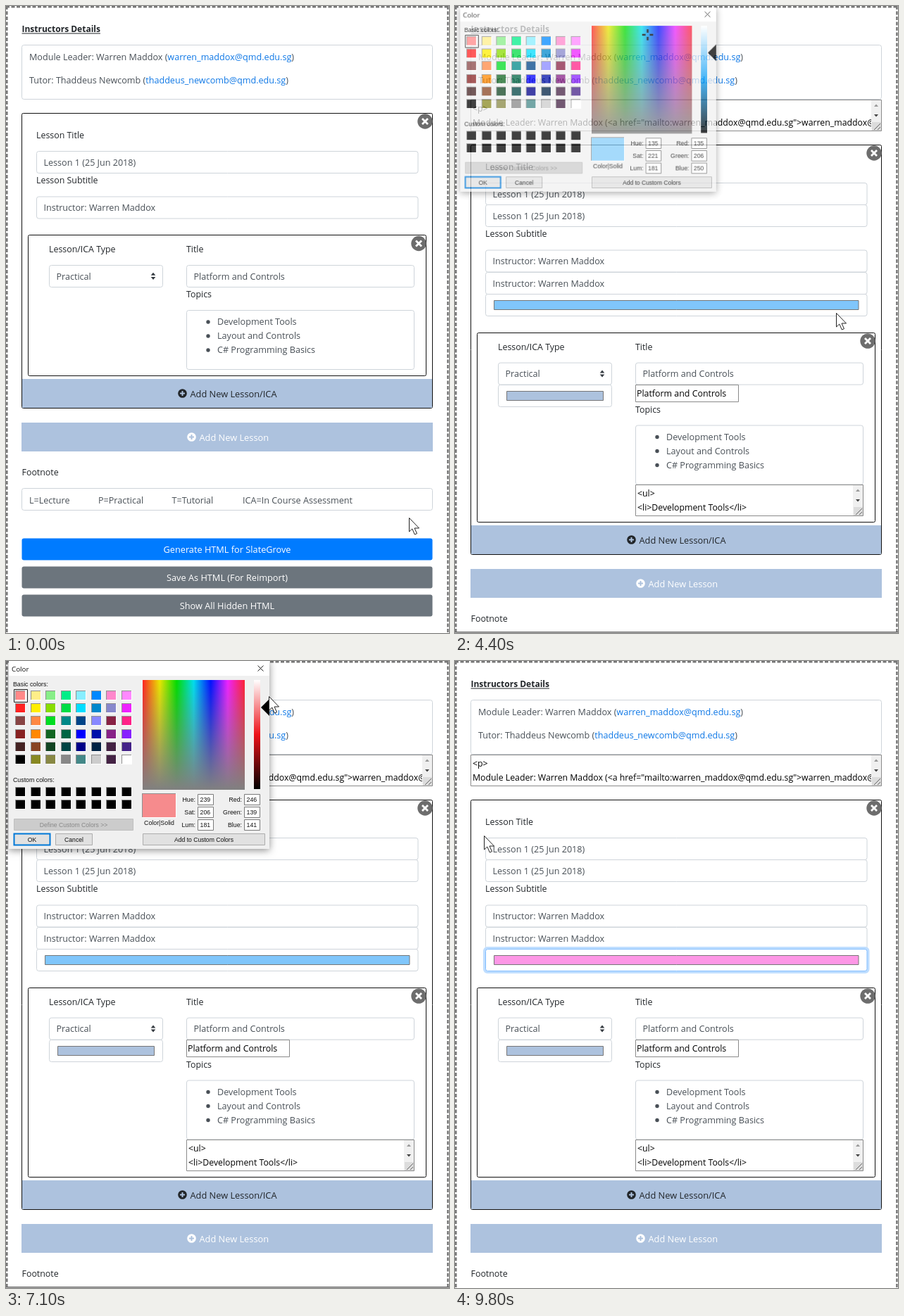
An HTML page with a canvas that plays this animation: 629x891 px, repeating every 10 s.

```html
<!DOCTYPE html>
<html lang="en">
<head>
<meta charset="utf-8">
<title>Lesson plan editor</title>
<style>
html, body { margin: 0; width: 100%; height: 100%; overflow: hidden; background: #fff; }
canvas { display: block; }
</style>
</head>
<body>
<canvas id="stage" width="629" height="891"></canvas>
<script>
const LOOP = 10000;
const UI = '"Open Sans", "Noto Sans", sans-serif';
const SMALL = '"Liberation Sans", Arial, sans-serif';
const INK = '#212529', FIELD = '#495057', LINE = '#ced4da', STEEL = '#adc2de';
const LEADER = 'Warren Maddox', LEADER_MAIL = 'warren_maddox@qmd.edu.sg';
const TUTOR = 'Thaddeus Newcomb', TUTOR_MAIL = 'thaddeus_newcomb@qmd.edu.sg';

const stage = document.getElementById('stage').getContext('2d');
const dialogLayer = document.createElement('canvas');
dialogLayer.width = 400;
dialogLayer.height = 300;
let g = stage;

const clamp = (v, a = 0, b = 1) => Math.min(b, Math.max(a, v));
const mix = (a, b, k) => `rgb(${a.map((v, i) => v + (b[i] - v) * k)})`;

// ---------- drawing helpers ----------
function text(s, x, y, { color = INK, size = 12.4, font = UI, weight = '', align = 'left' } = {}) {
  g.font = `${weight} ${size}px ${font}`;
  g.textAlign = align;
  g.fillStyle = color;
  g.fillText(s, x, y + size * 0.36);
  return x + g.measureText(s).width;
}
const fieldText = (s, x, y, color = FIELD) => text(s, x, y, { color, size: 12.6 });
function box(x, y, right, bottom, { fill, line, radius = 0, width = 1 } = {}) {
  g.beginPath();
  g.roundRect(x + 0.5, y + 0.5, right - x - 1, bottom - y - 1, radius);
  if (fill) { g.fillStyle = fill; g.fill(); }
  if (line) { g.strokeStyle = line; g.lineWidth = width; g.stroke(); }
}
function rect(x, y, w, h, color) {
  g.fillStyle = color;
  g.fillRect(x, y, w, h);
}
function shape(points, fill, line) {
  g.beginPath();
  points.forEach(p => g.lineTo(...p));
  g.closePath();
  if (fill) { g.fillStyle = fill; g.fill(); }
  if (line) { g.strokeStyle = line; g.lineWidth = 1; g.stroke(); }
}
function strokes(color, width, ...segments) {
  g.strokeStyle = color;
  g.lineWidth = width;
  g.beginPath();
  for (const [x1, y1, x2, y2] of segments) { g.moveTo(x1, y1); g.lineTo(x2, y2); }
  g.stroke();
}
function disc(x, y, r, color) {
  g.fillStyle = color;
  g.beginPath();
  g.arc(x, y, r, 0, 7);
  g.fill();
}
const triangle = (x, y, w, h, color) => shape([[x - w, y], [x + w, y], [x, y + h]], color);

// ---------- form parts ----------
const frame = (x, y, right, bottom) => box(x, y, right, bottom, { fill: '#fff', line: LINE, radius: 3 });
const card = (x, y, right, bottom) => box(x, y, right, bottom, { line: '#111', radius: 2 });
function input(s, x, y, right) {
  frame(x, y, right, y + 32);
  fieldText(s, x + 10.5, y + 16);
}
function colorInput(x, y, right, color, focused) {
  if (focused) box(x - 1.5, y - 1.5, right + 1.5, y + 33.5, { line: '#bfdeff', width: 4, radius: 4 });
  box(x, y, right, y + 32, { fill: '#fff', line: focused ? '#80bdff' : LINE, radius: 3 });
  box(x + 12, y + 9, right - 12, y + 23, { fill: color, line: '#777' });
}
function textarea(lines, x, y, right, bottom) {
  box(x, y, right, bottom, { fill: '#fff', line: '#8a8a8a' });
  lines.forEach((s, i) => text(s, x + 3, y + 12.5 + i * 20, { color: '#000', size: 12.3 }));
  rect(right - 15, y + 1, 14, bottom - y - 2, '#f0f0f0');
  triangle(right - 8, y + 10, 3, -3.5, '#999');
  triangle(right - 8, y + 21, 3, 3.5, '#444');
  rect(right - 14, bottom - 13, 13, 12, '#dcdcdc');
  strokes('#666', 1, [right - 11, bottom - 2, right - 2, bottom - 11], [right - 6, bottom - 2, right - 2, bottom - 6]);
}
function closeBadge(x, y) {
  disc(x, y, 10.7, '#6d6d6d');
  strokes('#fff', 2.8, [x - 4, y - 4, x + 4, y + 4], [x + 4, y - 4, x - 4, y + 4]);
}
function addBar(s, x, y, right, iconX, color, sign) {
  rect(x, y, right - x, 41, STEEL);
  disc(iconX, y + 20.5, 6.3, color);
  strokes(sign, 2, [iconX - 3.5, y + 20.5, iconX + 3.5, y + 20.5], [iconX, y + 17, iconX, y + 24]);
  text(s, iconX + 11, y + 21, { color, size: 12.8 });
}
function button(s, y, from, to, hover) {
  box(22, y, 606, y + 32, { fill: mix(from, to, hover), radius: 3 });
  text(s, 314, y + 16, { color: '#fff', align: 'center', size: 12.75 });
}
function person(role, name, mail, y) {
  const x = fieldText(`${role}: ${name} (`, 33, y);
  fieldText(')', fieldText(mail, x, y, '#0f78e6'), y);
}
const hover = (t, enter, leave) => clamp((t - enter) / 150) - clamp((t - leave) / 150);

// ---------- page ----------
function drawPage(t, open, accepted) {
  const shift = n => open ? n : 0;
  rect(0, 0, 629, 891, '#fff');
  g.setLineDash([5, 2.5]);
  strokes('#777', 2.5, [0, 1.2, 629, 1.2], [1.3, 0, 1.3, 891], [627.4, 0, 627.4, 891]);
  g.setLineDash([]);

  const end = text('Instructors Details', 22.5, 33, { weight: 'bold', size: 12 });
  rect(22.5, 38.5, end - 22.5, 1, INK);
  frame(22, 55, 606, 133);
  person('Module Leader', LEADER, LEADER_MAIL, 72);
  person('Tutor', TUTOR, TUTOR_MAIL, 105);
  if (open) {
    textarea(['<p>', `Module Leader: ${LEADER} (<a href="mailto:${LEADER_MAIL}">warren_maddox@q`], 22, 133, 606, 178);
  }

  let y = shift(45);
  card(22, 152 + y, 606, 572 + shift(208));
  closeBadge(595, 164 + y);
  text('Lesson Title', 43, 184 + y);
  input('Lesson 1 (25 Jun 2018)', 43, 206 + y, 585.5);
  if (open) input('Lesson 1 (25 Jun 2018)', 43, 282, 585.5);

  y = shift(76);
  text('Lesson Subtitle', 43, 248 + y);
  input('Instructor: ' + LEADER, 43, 270.5 + y, 585.5);
  if (open) {
    input('Instructor: ' + LEADER, 43, 378, 585.5);
    colorInput(43, 409, 585.5, accepted ? '#fd97e6' : '#80c6fb', accepted);
  }

  y = shift(138.6);
  card(31, Math.round(326 + y - 0.6), 597, open ? 734 : 526);
  closeBadge(586, 337.5 + y);
  text('Lesson/ICA Type', 61, 345.5 + y);
  text('Title', 256, 345.5 + y);
  input('Practical', 61, 368 + y, 223);
  triangle(209, 382.8 + y, 3.3, -4, '#343a40');
  triangle(209, 385 + y, 3.3, 4, '#343a40');
  input('Platform and Controls', 256, 368 + y, 580);
  if (open) {
    colorInput(61, 538, 223, STEEL);
    box(256, 538, 403, 563, { fill: '#fff', line: '#8a8a8a' });
    text('Platform and Controls', 258, 551, { color: '#000' });
  }

  y = shift(163.5);
  text('Topics', 256, 410 + y);
  frame(256, 432 + y, 580, 517 + y);
  ['Development Tools', 'Layout and Controls', 'C# Programming Basics'].forEach((s, i) => {
    disc(287, 449 + y + i * 20, 2.7, FIELD);
    fieldText(s, 300, 448.5 + y + i * 20);
  });
  if (open) textarea(['<ul>', '<li>Development Tools</li>'], 256, 680, 580, 725);

  y = shift(208);
  addBar('Add New Lesson/ICA', 23, 530 + y, 605, 250.5, INK, STEEL);
  addBar('Add New Lesson', 22, 592 + y, 606, 263.5, '#fff', STEEL);
  text('Footnote', 22.5, 663 + y);
  if (open) return;
  frame(22, 685, 606, 717);
  [['L=Lecture', 33], ['P=Practical', 131], ['T=Tutorial', 235.5], ['ICA=In Course Assessment', 336]]
    .forEach(([s, x]) => fieldText(s, x, 702));
  const grey = [108, 117, 125], dark = [90, 98, 104];
  button('Generate HTML for SlateGrove', 756, [0, 123, 255], [0, 105, 217], hover(t, 1550, 1700));
  button('Save As HTML (For Reimport)', 796, grey, dark, hover(t, 1720, 1880));
  button('Show All Hidden HTML', 836, grey, dark, hover(t, 1880, LOOP));
}

// ---------- colour dialog ----------
const PALETTE = ('f88 fe8 8e8 0e8 8ef 08f f8c f8f  f22 fe0 8d0 0d4 0df 08c 88c e2f ' +
  '844 f84 0d2 088 048 88f 824 f28  822 f80 162 064 00f 01a 828 82f ' +
  '422 842 142 044 008 024 424 428  000 882 884 888 488 ccc 424 fff').split(/ +/);

// Values for a point in the hue/saturation field, at the dialog's fixed luminance.
function picked(x, y) {
  const hue = Math.round((clamp(x, 194, 339) - 194) * 239 / 145);
  const sat = Math.round(240 - (clamp(y, 28, 183) - 28) * 240 / 155);
  const lum = 181 / 240, chroma = (2 - 2 * lum) * sat / 240;
  const rgb = [0, 4, 2].map(n => {
    const k = Math.abs((hue / 40 + n) % 6 - 3) - 1;
    return Math.round(255 * (lum + chroma * (clamp(k) - 0.5)));
  });
  return { hue, sat, rgb };
}
function gradient(x1, y1, x2, y2, colors) {
  const fill = g.createLinearGradient(x1, y1, x2, y2);
  colors.forEach((c, i) => fill.addColorStop(i / (colors.length - 1), c));
  return fill;
}
function well(x, y, w, h, color) {
  rect(x - 1, y - 1, w + 2, h + 2, '#fff');
  rect(x - 1, y - 1, w + 1, h + 1, '#909090');
  rect(x, y, w, h, color);
}
function drawDialog({ hue, sat, rgb }, cross) {
  const label = (s, x, y, align, color = '#111', size = 8.8) => text(s, x, y, { size, font: SMALL, align, color });
  const push = (s, x, y, right, line = '#adadad', width = 1, fill = '#e1e1e1', color) => {
    box(x, y, right, y + 17, { fill, line, width });
    label(s, (x + right) / 2, y + 9, 'center', color, 8.6);
  };
  g.clearRect(0, 0, 400, 300);
  g.shadowColor = 'rgba(0,0,0,.45)';
  g.shadowBlur = 10;
  g.shadowOffsetY = 2;
  rect(4, -1, 370, 268, '#f0f0f0');
  g.shadowColor = 'transparent';
  rect(4, -1, 370, 22, '#fff');
  text('Color', 8, 11, { size: 9.8, color: '#111' });
  strokes('#222', 1, [357.5, 6.5, 365.5, 14.5], [365.5, 6.5, 357.5, 14.5]);

  label('Basic colors:', 10, 33);
  label('Custom colors:', 10, 169);
  for (let i = 0; i < 64; i++) {
    const y = i < 48 ? 43 + (i >> 3) * 18.2 : 180 + (i - 48 >> 3) * 18;
    well(Math.round(14 + i % 8 * 21.5), Math.round(y), 13, 12, '#' + (PALETTE[i] || '000'));
  }
  box(11, 40, 31, 59, { line: '#222' });

  push('Define Custom Colors >>', 11, 224, 181, '#bfbfbf', 1, '#ccc', '#888');
  push('OK', 11, 245, 63, '#0078d7', 2);
  push('Cancel', 70, 245, 123);
  push('Add to Custom Colors', 194, 245, 368);

  rect(194, 27, 145, 156, gradient(194, 0, 339, 0, ['#f22', '#eae600', '#0d0', '#0de', '#01f', '#e2f', '#f23']));
  rect(194, 27, 145, 156, gradient(0, 27, 0, 183, ['rgba(128,128,128,0)', 'rgb(128,128,128)']));
  if (cross) {
    const [x, y] = cross;
    strokes('#000', 2.6, [x - 8, y, x - 3, y], [x + 3, y, x + 8, y], [x, y - 8, x, y - 3], [x, y + 3, x, y + 8]);
  }
  const pure = [0, 4, 2].map(n => Math.round(127.5 + 255 * sat / 240 * (clamp(Math.abs((hue / 40 + n) % 6 - 3) - 1) - 0.5)));
  rect(352, 27, 9, 155, gradient(0, 27, 0, 182, ['#fff', `rgb(${pure})`, '#000']));
  shape([[362, 66], [374, 54], [374, 78]], '#000');

  well(194, 189, 47, 33, `rgb(${rgb})`);
  label('Color|Solid', 217.5, 229.5, 'center');
  const rows = [['Hue:', hue, 'Red:'], ['Sat:', sat, 'Green:'], ['Lum:', 181, 'Blue:']];
  rows.forEach(([name, value, channel], i) => {
    const y = Math.round(196.5 + i * 18.3);
    [[name, value, 269], [channel, rgb[i], 335]].forEach(([s, v, x]) => {
      label(s, x, y, 'right');
      box(x + 3, y - 8, x + 26, y + 8, { fill: '#fff', line: '#7a7a7a' });
      label(v, x + 6.5, y);
    });
  });
}

// ---------- pointer ----------
const PATH = [
  [0, 572, 727], [1400, 572, 727], [1900, 549, 841], [2450, 549, 841], [3500, 552, 444], [3700, 541, 436],
  [4900, 541, 436], [5400, 344, 160], [5900, 277, 42], [6100, 276, 40], [6400, 287, 47.4], [6800, 352, 55],
  [7100, 373, 50], [7400, 320, 43.5], [7550, 320, 43.5], [8000, 199, 160], [8500, 41, 248], [LOOP, 41, 248]
];
// Monotone cubic through the path: smooth passes, no overshoot at stops.
function pointer(t) {
  const i = PATH.findIndex(p => p[0] > t) - 1;
  const rate = (j, c) => PATH[j] && PATH[j + 1] ? (PATH[j + 1][c] - PATH[j][c]) / (PATH[j + 1][0] - PATH[j][0]) : 0;
  const tangent = (j, c) => {
    const a = rate(j - 1, c), b = rate(j, c);
    return a * b > 0 ? 2 * a * b / (a + b) : 0;
  };
  const span = PATH[i + 1][0] - PATH[i][0], k = (t - PATH[i][0]) / span;
  return [1, 2].map(c => {
    const a = PATH[i][c], b = PATH[i + 1][c], s = k * k * (3 - 2 * k);
    return a + (b - a) * s + span * k * (1 - k) * ((1 - k) * tangent(i, c) - k * tangent(i + 1, c));
  });
}
function drawPointer(x, y, hand) {
  g.save();
  g.translate(x, y);
  g.lineJoin = 'round';
  if (hand) {
    shape([[-2, 1], [0, -0.5], [2, 1], [2, 8], [5, 8], [6, 9], [9, 9.5], [11, 11], [11, 18], [9, 21], [9, 25],
      [-2, 25], [-2, 22], [-7, 14], [-6, 12], [-4, 12.5], [-2, 15]], '#fff', '#000');
    strokes('#000', 1, [2, 8, 2, 13], [5.5, 9, 5.5, 13], [8.5, 10, 8.5, 14]);
  } else {
    shape([[0.5, 0.5], [0.5, 20], [4.8, 16], [8.3, 24], [11.5, 22.6], [8, 15], [14.5, 15]], '#fff', '#222');
  }
  g.restore();
}

// ---------- timeline ----------
const EXPAND = 2300, DIALOG_IN = 4300, DIALOG_OUT = 8700, DRAG_START = 6100, DRAG_END = 7400;
const INITIAL = { hue: 135, sat: 221, rgb: [135, 206, 250] };

function draw(t) {
  const [x, y] = pointer(t);
  const open = t >= EXPAND;
  g = stage;
  drawPage(t, open, t >= DIALOG_OUT);

  const shown = t < DIALOG_OUT
    ? 1 - (1 - clamp((t - DIALOG_IN) / 200)) ** 2
    : 1 - clamp((t - DIALOG_OUT + 100) / 200);
  if (shown > 0) {
    const choice = t < DRAG_START ? INITIAL : picked(...pointer(Math.min(t, DRAG_END)));
    const cross = t < DRAG_START ? [275, 40] : t > DRAG_END ? [320, 43.5] : null;
    g = dialogLayer.getContext('2d');
    drawDialog(choice, cross);
    g = stage;
    rect(0, 889, 629, 1.5, '#666');
    const scale = 0.93 + 0.07 * shown;
    g.save();
    g.globalAlpha = shown;
    g.translate(190, 90);
    g.scale(scale, scale);
    g.drawImage(dialogLayer, -190, -90);
    g.restore();
  }
  drawPointer(x, y, !open && y > 756);
}

function tick() {
  draw(Math.floor(performance.now() % LOOP / 100) * 100);
  requestAnimationFrame(tick);
}
tick();
</script>
</body>
</html>
```
